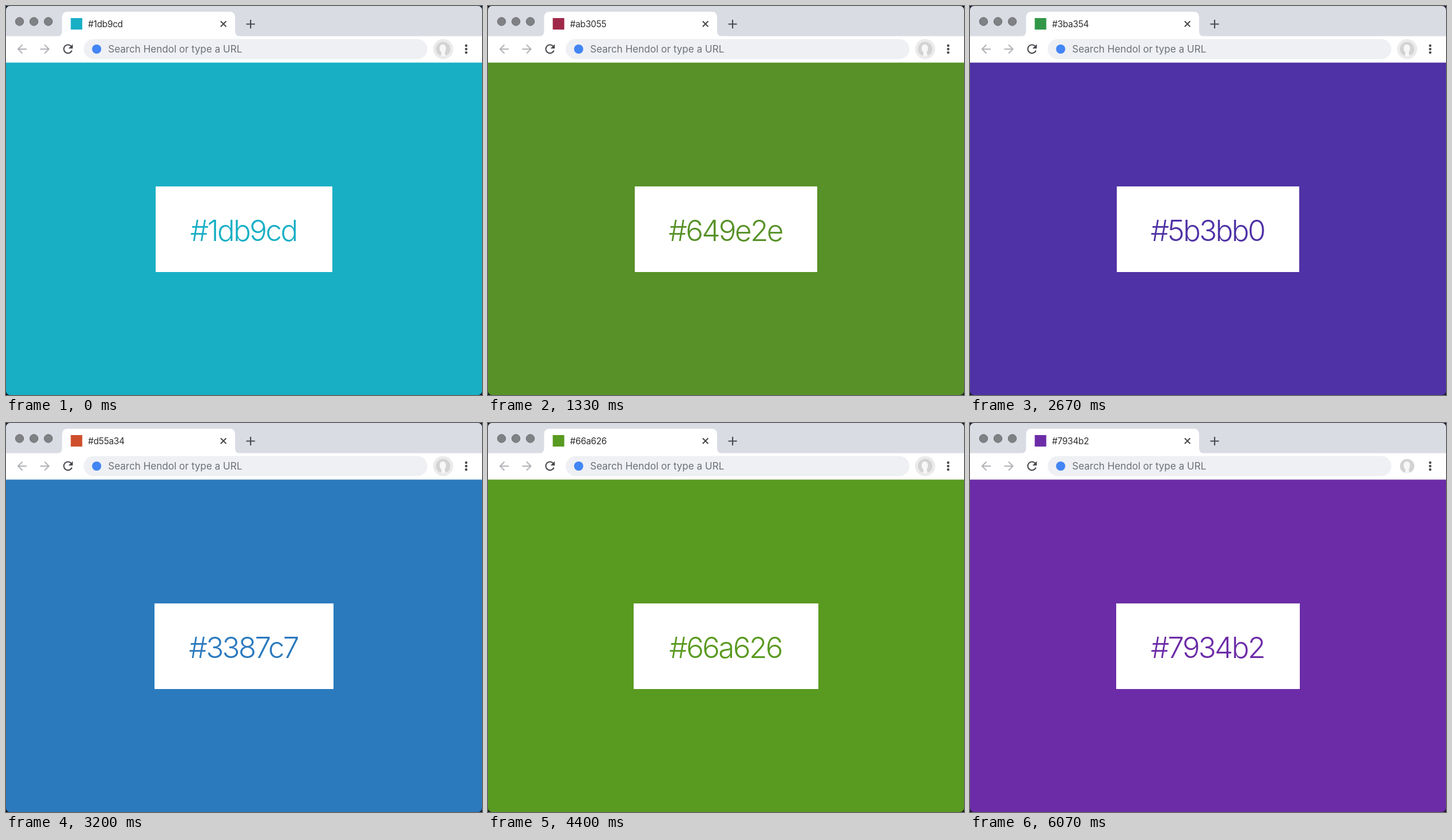
An HTML page that plays this animation: 827 by 677 pixels, repeating every 6140 ms.

```html
<!DOCTYPE html>
<html lang="en">
<head>
<meta charset="utf-8">
<title>Random colours</title>
<style>
  html, body { margin: 0; width: 100%; height: 100%; overflow: hidden; background: #10131f; }
  svg { display: block; font-family: Inter, "Open Sans", sans-serif; }
  .window { clip-path: inset(0 round 7px); }
  .icon { fill: none; stroke: #484a4e; stroke-width: 2.1; }
  .dim { stroke: #b1b3b7; }
  #label { font-size: 51px; font-weight: 300; letter-spacing: -2.7px; text-anchor: middle; }
  #title { font-size: 15.3px; letter-spacing: -.25px; fill: #2c2d30; }
  .hint { font-size: 17px; fill: #6d7176; }
</style>
</head>
<body>
<svg width="827" height="677" viewBox="0 0 827 677">
  <g class="window">
    <rect id="page" width="827" height="677"/>
    <rect width="827" height="53" fill="#dadce4"/>
    <rect y="52.5" width="827" height="46" fill="#fff"/>
    <g fill="#808184" stroke="#6c6d71">
      <circle cx="23.5" cy="27" r="7.2"/>
      <circle cx="48.5" cy="27" r="7.2"/>
      <circle cx="73.5" cy="27" r="7.2"/>
    </g>

    <!-- tab -->
    <path fill="#fff" d="M88 53q9.500 0 9.500-9.500V19.500q0-9.500 9.500-9.500H388.500q9.500 0 9.500 9.500V43.500q0 9.500 9.500 9.500z"/>
    <rect id="favicon" x="112.500" y="21" width="20" height="20"/>
    <text id="title" x="142.500" y="36.500"></text>
    <path class="icon" d="M373 26.500l9.500 9.500m0-9.500l-9.500 9.500"/>
    <path class="icon" stroke-width="2.400" d="M417.500 31.500h15m-7.500-7.500v15"/>

    <!-- toolbar -->
    <path class="icon dim" d="M36 75H21m7.500-7.500L21 75l7.500 7.500"/>
    <path class="icon dim" d="M59.500 75h15m-7.500-7.500l7.500 7.500-7.500 7.500"/>
    <path class="icon" d="M113.200 70A7.300 7.300 0 1 0 114.500 77.500"/>
    <path fill="#484a4e" d="M116 66.500v7.500h-7.500z"/>
    <rect x="135" y="57.500" width="597" height="35" rx="17.500" fill="#eef0f4"/>
    <circle cx="157.500" cy="75" r="8" fill="#4285f4"/>
    <text class="hint" x="177.500" y="81.300">Search Hendol or type a URL</text>
    <circle id="halo" cx="759.500" cy="75" r="17.500" fill="#ebebeb"/>
    <circle cx="759.500" cy="75" r="12.500" fill="#d3d3d4"/>
    <path fill="#f7f7f7" d="M759 67c4 0 5.500 3 5.300 7 0 3-1 5-2 6.500 0 2 .5 4 2.200 5.800q-4.500 2-9.500 .5c1.500-1.500 1.700-4 1.500-6-2-1.500-3-4-3-7 0-4 1.500-6.800 5.500-6.800z"/>
    <g fill="#484a4e">
      <circle cx="799.500" cy="69" r="2.200"/>
      <circle cx="799.500" cy="75" r="2.200"/>
      <circle cx="799.500" cy="81" r="2.200"/>
    </g>

    <rect id="card" y="314" height="149" fill="#fff"/>
    <text id="label" x="412.500" y="408.500"></text>
  </g>
</svg>
<script>
const LOOP = 6140, TAB_LAG = 60;

// start time, colour, card width
const steps = [
  [0, '1db9cd', 307], [670, '6555ce'], [800, 'c2479d'], [930, '2f9c6b'],
  [1070, 'ab3055'], [1330, '649e2e'], [1470, '8a3fc4'], [1670, 'c96a2b'],
  [1800, '2b8fa8'], [2000, '2e449e', 319], [2200, 'b83a7c'], [2400, '3ba354'],
  [2670, '5b3bb0'], [2870, '2a9d94'], [3070, 'd55a34'], [3200, '3387c7', 311],
  [3330, 'a42f8e'], [3470, '3f9e3c'], [3600, 'c53b4d'], [3800, '4a5fd0'],
  [4000, 'b5782a'], [4130, '9b36ab'], [4330, '66a626', 321], [4470, '2d6fb5'],
  [4870, 'cf4468'], [5000, '2ea57f'], [5130, '5747c2'], [5270, 'b95327'],
  [5400, '7934b2', 319]
];

const $ = id => document.getElementById(id);
const set = (id, attrs) => {
  for (const name in attrs) $(id).setAttribute(name, attrs[name]);
};
const stepAt = t => steps.findLast(s => s[0] <= Math.max(t, 0));

// The screen's colour profile darkens the middle tones.
const shown = hex => 'rgb(' + hex.match(/../g).map(pair => {
  const v = parseInt(pair, 16);
  return Math.round(v - 13.5 * Math.sin(Math.PI * v / 255));
}) + ')';

function draw() {
  const t = performance.now() % LOOP;
  const [, hex, width = 317] = stepAt(t);
  const tabHex = stepAt(t - TAB_LAG)[1];

  set('page', { fill: shown(hex) });
  set('card', { x: 413.5 - width / 2, width });
  set('label', { fill: shown(hex) });
  $('label').textContent = '#' + hex;

  set('favicon', { fill: shown(tabHex) });
  $('title').textContent = '#' + tabHex;

  set('halo', { opacity: Math.min(1, Math.max(0, (6070 - t) / 540)) });
  requestAnimationFrame(draw);
}
draw();
</script>
</body>
</html>
```
